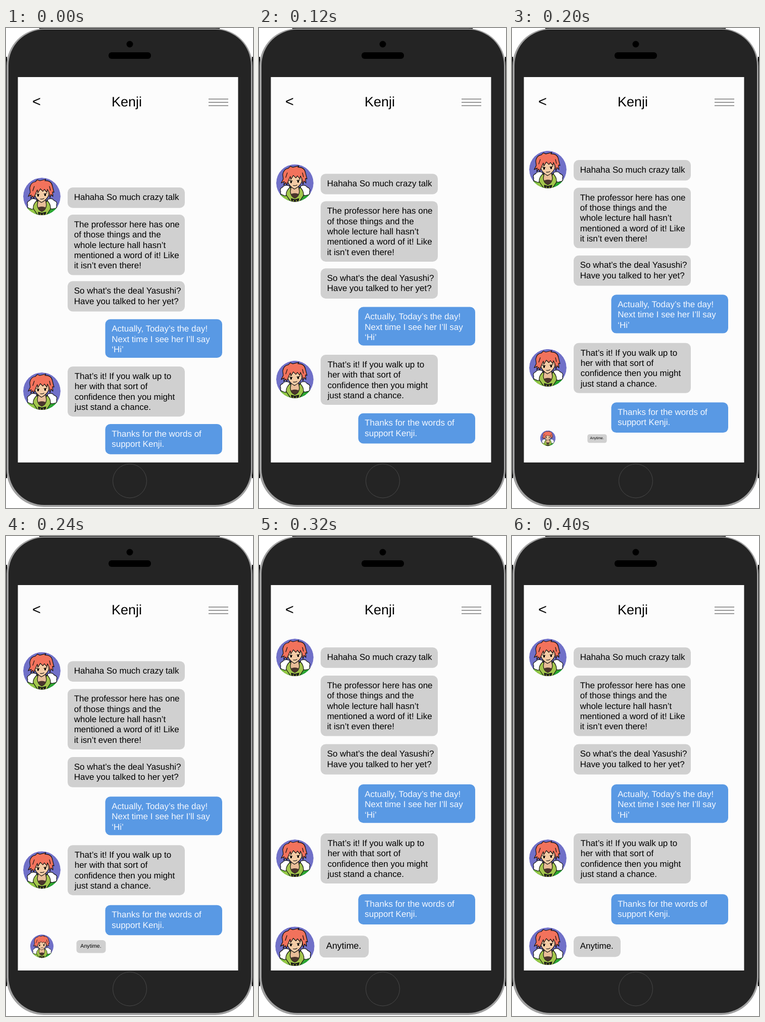
An HTML page that plays this animation: 489 by 949 pixels, repeating every 640 ms.

```html
<!DOCTYPE html>
<html lang="en">
<head>
<meta charset="utf-8">
<title>Chat</title>
<style>
  html, body { margin: 0; width: 100%; height: 100%; overflow: hidden; background: #fff; }
  svg { display: block; width: 489px; height: 949px; }
  text { font: 17px "Liberation Sans", Arial, sans-serif; text-rendering: geometricPrecision; }
  .title { font-size: 27px; }
  .back { font-size: 29px; }
  .theirs rect { fill: #d0d0d0; }
  .mine rect { fill: #5999e4; }
  .mine text { fill: #f4f8ff; }
  .ink { stroke: #111; stroke-width: 1.2; stroke-linejoin: round; stroke-linecap: round; }
</style>
</head>
<body>
<svg viewBox="0 0 489 949">
  <defs>
    <clipPath id="disc"><circle r="37"/></clipPath>
    <linearGradient id="coat" x2="1" y2="0.5">
      <stop offset="0.15" stop-color="#3fa83a"/>
      <stop offset="0.5" stop-color="#9aca45"/>
      <stop offset="0.95" stop-color="#16a02c"/>
    </linearGradient>
    <g id="avatar" clip-path="url(#disc)">
      <circle r="37" fill="#7070c8"/>
      <g class="ink">
        <path fill="url(#coat)" d="M-37 38L-30 25Q-18 10-8 9L9 9Q23 13 33 25L37 38Z"/>
        <path fill="#fff" d="M-10 6Q-20 2-24 8Q-31 11-28 17Q-30 23-23 24Q-18 28-13 20Z"/>
        <path fill="#fff" d="M11 6Q20 2 24 8Q32 11 29 17Q31 24 24 24Q18 27 13 20Z"/>
        <path fill="#a3c64c" d="M-9 8Q-18 15-17 24L-8 37H9L17 25Q18 15 10 8L5 21H-5Z"/>
        <path fill="#e9bd98" d="M-7 5L-9 17Q-8 27 0 30Q8 27 9 17L7 5Z"/>
        <path fill="#4a352c" stroke="none" d="M-8 22Q0 18 8 22Q6 28 0 30Q-6 28-8 22Z"/>
        <path fill="#222" d="M-7 31L0 33 8 31 6 38H-6Z"/>
        <path stroke="#b6c92c" d="M-3 34V37M3 34V37"/>
        <path fill="#f3cba5" d="M-15-16L-14-2Q-11 6-1 12Q10 7 14-3L14-17Z"/>
        <path fill="#f2725c" d="M-16 4L-18-1-22 4-21-3-27 0-23-8-24-17Q-22-28-13-29L-9-33-4-31 8-34 6-31Q19-32 21-20L24-8 21-9 22 0 18-4 16 3 14-8 11-14 10-8 5-14 2-10-3-15-8-7-9-13-13-4Z"/>
        <path fill="none" d="M-11-5L-5-4M4-5L10-6M-3 5Q1 6 4 4M-15-20L-18-11M15-20L17-12"/>
      </g>
      <path d="M-9-4h3v4h-3zM5-5h3v4h-3z"/>
    </g>
  </defs>

  <path d="M66 0H423V2H66zM0 57H2V890H0zM487 57H489V890H487z"/>
  <rect x="1" y="1" width="487" height="946" rx="74" fill="#a0a0a0"/>
  <rect x="5" y="3" width="480" height="940" rx="71" fill="#242424"/>
  <circle cx="245" cy="32" r="6.5"/>
  <rect x="203" y="48" width="84" height="13" rx="6"/>
  <rect x="23.5" y="97" width="436" height="762" fill="#fcfcfc"/>
  <circle cx="245" cy="895.5" r="33.5" fill="none" stroke="#484848"/>
  <text class="back" x="52" y="155">&lt;</text>
  <text class="title" x="239" y="155" text-anchor="middle">Kenji</text>
  <path d="M401 140.5H440M401 147H440M401 153.5H440" stroke="#777" stroke-width="1.6"/>
  <g id="chat"></g>
</svg>
<script>
const chat = document.getElementById("chat");
const risers = [];

function add(markup, rise) {
  chat.insertAdjacentHTML("beforeend", markup);
  const node = chat.lastElementChild;
  if (rise) risers.push({ node, rise });
  return node;
}

function bubble(side, x, y, w, h, lines, inset = 12.7) {
  const text = lines.map((line, i) =>
    `<text x="${x + inset}" y="${y + 24.7 + i * 20.4}">${line}</text>`).join("");
  return `<g class="${side}"><rect x="${x}" y="${y}" width="${w}" height="${h}" rx="10"/>${text}</g>`;
}

const avatar = y => `<g><use href="#avatar" x="71" y="${y}"/></g>`;
const theirs = (y, h, rise, lines, inset) =>
  add(bubble("theirs", 122, y, 232, h, lines, inset), rise);
const mine = (y, h, rise, lines) => add(bubble("mine", 196.5, y, 231.5, h, lines), rise);

add(avatar(240), 93);
theirs(220.3, 40.5, 95, ["Hahaha So much crazy talk"]);
theirs(276, 119.5, 93, ["The professor here has one", "of those things and the",
  "whole lecture hall hasn’t", "mentioned a word of it! Like", "it isn’t even there!"]);
theirs(411.6, 59.8, 89, ["So what’s the deal Yasushi?", "Have you talked to her yet?"]);
mine(491, 76.3, 84.7, ["Actually, Today’s the day!", "Next time I see her I’ll say", "‘Hi’"]);
add(avatar(637), 81);
theirs(588, 99, 81.3, ["That’s it! If you walk up to", "her with that sort of",
  "confidence then you might", "just stand a chance."], 13.7);
mine(708.3, 59.7, 74.8, ["Thanks for the words of", "support Kenji."]);

const poppers = [
  { node: add(avatar(811)), x: 71, y: 811 },
  { node: add(bubble("theirs", 122, 791.2, 93, 41, ["Anytime."])), x: 168.5, y: 811.7 },
];

// The reply grows past full size, then settles.
function popScale(step) {
  if (step < 3) return 0;
  return step <= 7 ? 0.2 + 0.2125 * (step - 3) : 1.05 - 0.025 * (step - 7);
}

function draw(now) {
  const step = Math.max(0, Math.min(9, Math.floor((now % 640) / 40) - 1));
  const left = 1 - Math.min(step, 7) / 7;
  for (const { node, rise } of risers)
    node.setAttribute("transform", `translate(0 ${rise * left})`);
  const scale = popScale(step);
  for (const { node, x, y } of poppers) {
    node.setAttribute("visibility", scale ? "visible" : "hidden");
    node.setAttribute("transform", `translate(${x} ${y}) scale(${scale}) translate(${-x} ${-y})`);
  }
  requestAnimationFrame(draw);
}
draw(performance.now());
</script>
</body>
</html>
```
